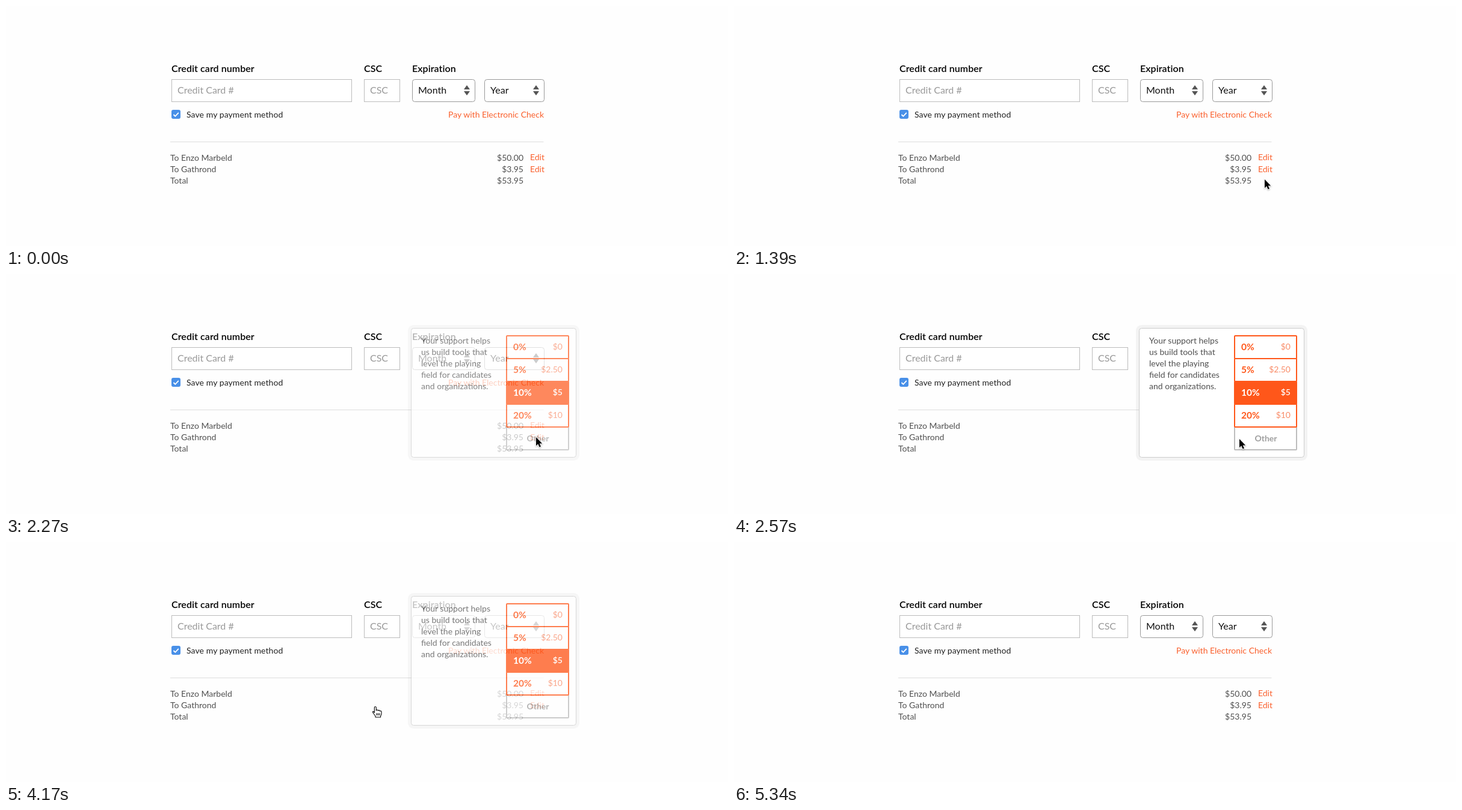
Recreate the animation shown at these times as an HTML page. Size 1200 px wide and 400 px high, loop 6.24 s.

```html
<!DOCTYPE html>
<html lang="en">
<head>
<meta charset="utf-8">
<title>Payment form</title>
<style>
  html, body { margin: 0; width: 100%; height: 100%; overflow: hidden; background: #fefefe; }
  svg { display: block; width: 100%; height: 100%; }
  text { font: 400 14px Lato, "Open Sans", sans-serif; fill: #505050; }
  .label { font-size: 16px; font-weight: 600; letter-spacing: .07px; fill: #000; }
  .field { font-size: 16px; fill: #999; }
  .choice { font-size: 16px; fill: #111; }
  .dark { fill: #222; letter-spacing: .08px; }
  .link { fill: #fa602d; }
  .end { text-anchor: end; }
  .input { fill: #fff; stroke: #bcbcbc; }
  .select { fill: #fff; stroke: #999; }
  .percent { font-size: 15.5px; font-weight: 700; fill: #ff571a; }
  .price { text-anchor: end; fill: #f98c68; }
  .picked { fill: #fff; }
  .price.picked { font-weight: 600; }
  .other { font-weight: 700; text-anchor: middle; fill: #a0a0a0; }
</style>
</head>
<body>
<svg viewBox="0 0 1200 400">
  <defs>
    <path id="arrows" d="M0 7 5 0 10 7Z M0 10H10L5 17Z" fill="#555"/>
  </defs>

  <text class="label" x="275" y="110">Credit card number</text>
  <text class="label" x="595" y="110">CSC</text>
  <text class="label" x="675" y="110">Expiration</text>

  <rect class="input" x="275.5" y="122.5" width="299" height="37"/>
  <rect class="input" x="595.5" y="122.5" width="59" height="37"/>
  <rect class="select" x="675.5" y="122.5" width="104" height="37" rx="4"/>
  <rect class="select" x="795.5" y="122.5" width="99" height="37" rx="4"/>
  <text class="field" x="285" y="146">Credit Card #</text>
  <text class="field" x="605" y="146">CSC</text>
  <text class="choice" x="685" y="146">Month</text>
  <text class="choice" x="805" y="146">Year</text>
  <use href="#arrows" x="761" y="132"/>
  <use href="#arrows" x="876" y="132"/>

  <rect x="275" y="173" width="15" height="15" rx="3" fill="#4990e8"/>
  <path d="M278.5 181 281.3 183.8 286.8 177.8" fill="none" stroke="#fff" stroke-width="1.8"/>
  <text class="dark" x="300" y="186">Save my payment method</text>
  <text class="link end" x="894" y="186">Pay with Electronic Check</text>

  <path d="M273 226.5H893.5" stroke="#ddd"/>
  <text x="273" y="258">To Enzo Marbeld</text>
  <text x="273" y="277">To Gathrond</text>
  <text x="273" y="296">Total</text>
  <text class="end" x="860" y="258">$50.00</text>
  <text class="end" x="860" y="277">$3.95</text>
  <text class="end" x="860" y="296">$53.95</text>
  <text class="link end" x="895" y="257">Edit</text>
  <text class="link end" x="895" y="277">Edit</text>

  <g id="popover">
    <rect x="668" y="85" width="285" height="226" rx="9" fill="#000" fill-opacity=".045"/>
    <rect x="673.5" y="90.5" width="274" height="215" rx="4" fill="#fff" stroke="#ccc"/>
    <rect x="832" y="255" width="103" height="38" rx="1" fill="#fff" stroke="#bdbdbd" stroke-width="2"/>
    <text class="other" x="884" y="279">Other</text>
  </g>

  <g id="cursor">
    <path id="arrow" d="M0 0V14.2L3.2 11.2 5.6 16.6 8 15.6 5.7 10.4H10.2Z"
      stroke="#fff" paint-order="stroke" stroke-width="1.6"
      style="filter: drop-shadow(0 1px 1px rgba(0,0,0,.3))"/>
    <g id="hand" stroke="#000" stroke-width="1.1" stroke-linejoin="round">
      <path fill="#fff" d="M-1.7 10.5V2Q-1.7.5-.2.5T1.3 2V7Q1.5 5.5 3 5.8 4.2 6 4.3 7.2 5 6 6.2 6.4 7.3 6.7 7.3 8
        8 7.2 9 7.6 10 8 10 9.2V12Q10 14 8.6 16V18H0V16.5Q-1 14.5-3 12-5 9.5-4.3 8.6-3.4 7.6-1.7 10.5Z"/>
      <path d="M2 11.3V15M4.4 11.3V15M6.8 11.3V15"/>
    </g>
  </g>
</svg>

<script>
const LOOP = 6240;
const $ = id => document.getElementById(id);

function add(parent, tag, attrs, content = "") {
  const node = document.createElementNS("http://www.w3.org/2000/svg", tag);
  for (const key in attrs) node.setAttribute(key, attrs[key]);
  node.textContent = content;
  parent.append(node);
}

const message = ["Your support helps", "us build tools that", "level the playing",
  "field for candidates", "and organizations."];
message.forEach((line, i) => add($("popover"), "text", { x: 690, y: 116 + 19 * i }, line));

const tips = [["0%", "$0"], ["5%", "$2.50"], ["10%", "$5"], ["20%", "$10"]];
tips.forEach(([percent, price], i) => {
  const y = 103 + 38 * i;
  const picked = i === 2 ? " picked" : "";
  add($("popover"), "rect", { x: 832, y, width: 103, height: 38, rx: 1,
    fill: picked ? "#ff571a" : "#fff", stroke: "#ff571a", "stroke-width": 2 });
  add($("popover"), "text", { class: "percent" + picked, x: 843, y: y + 24 }, percent);
  add($("popover"), "text", { class: "price" + picked, x: 925, y: y + 23 }, price);
});

// Motion runs in even steps; the bias absorbs rounding of step times.
const stepAt = (t, start, end, count) =>
  Math.min(count, Math.floor((t - start) / (end - start) * count + .15));
const mix = (a, b, u) => a + (b - a) * u;

const fadeIn = [.1, .4, .7, .92];
const fadeOut = [.77, .46, .16, .05, .02, 0];

function popoverOpacity(t) {
  if (t < 2160) return 0;
  if (t < 4170) return fadeIn[stepAt(t, 2160, 3150, 17)] ?? 1;
  return fadeOut[stepAt(t, 4170, 4460, 5)];
}

function cursorAt(t) {
  if (t < 420 || t >= 5340) return null;
  if (t < 2160) {
    const u = stepAt(t, 420, 1680, 21) / 21;
    const y = 272 + 46 * (1 + Math.cos(Math.PI * u ** 1.2));
    return { x: 881 + 309 * (1 - u) ** 4, y, hand: y < 280 };
  }
  if (t < 4990) {
    const u = stepAt(t, 2160, 3150, 17) / 17;
    const out = Math.min(1, Math.max(0, (u - .17) / .415)) ** 2;
    const rest = 1 - (1 - Math.max(0, (u - .585) / .415)) ** 2;
    const x = mix(mix(881, 760, out), 614, rest);
    return { x, y: mix(mix(272, 281, out), 274, rest), hand: x < 673 };
  }
  const u = (stepAt(t, 4990, 5340, 6) + .5) / 6;
  return { x: mix(614, 628, u), y: mix(274, 406, u * u), hand: false };
}

function draw(now) {
  const t = now % LOOP;
  $("popover").setAttribute("opacity", popoverOpacity(t));
  const cursor = cursorAt(t);
  $("cursor").style.display = cursor ? "" : "none";
  if (cursor) {
    $("cursor").setAttribute("transform", `translate(${Math.round(cursor.x)} ${Math.round(cursor.y)})`);
    $("hand").style.display = cursor.hand ? "" : "none";
    $("arrow").style.display = cursor.hand ? "none" : "";
  }
}

let origin;
function tick(now) {
  origin ??= now;
  draw(now - origin);
  requestAnimationFrame(tick);
}
draw(0);
requestAnimationFrame(tick);
</script>
</body>
</html>
```
